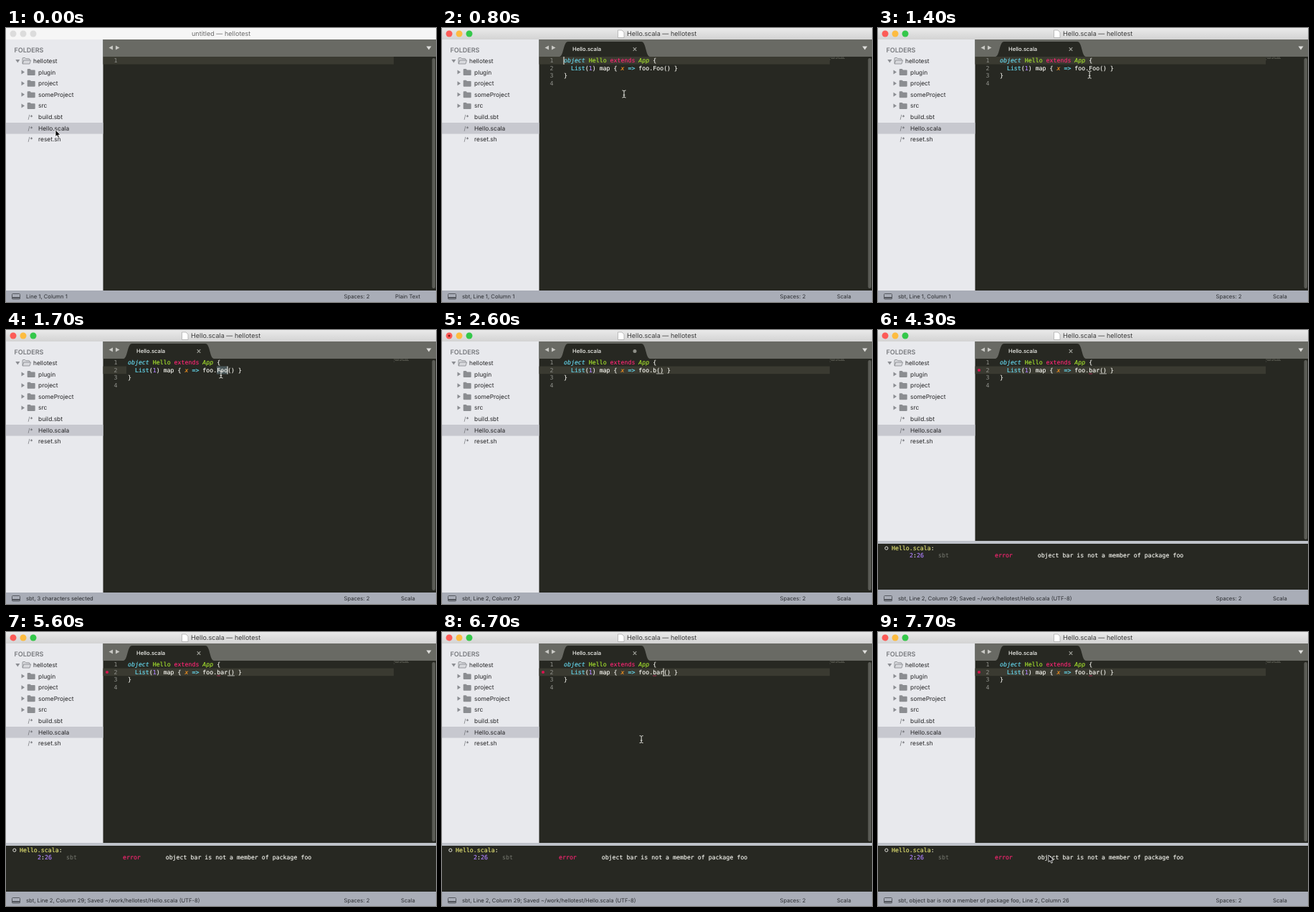
Recreate the animation shown at these times as an HTML page. Size 600 px wide and 382 px high, loop 8 s.

```html
<!DOCTYPE html>
<html lang="en">
<head>
<meta charset="utf-8">
<title>Editor</title>
<style>
  html, body { margin: 0; width: 100%; height: 100%; overflow: hidden; background: #272822; }
  svg { display: block; width: 100vw; height: 100vh; }
  text { font: 8.4px Inter, "Open Sans", sans-serif; fill: #252527; text-rendering: geometricPrecision; white-space: pre; }
  .title { font-size: 9.06px; fill: #3b3b3b; }
  .small { font-size: 7.65px; fill: #2b2d31; }
  .code text { font: 8.25px "DejaVu Sans Mono", monospace; fill: #f8f8f2; stroke: #f8f8f2; stroke-width: .15px; }
  .code .gutter { fill: #8f908a; stroke: none; text-anchor: end; }
  .code .blue { fill: #66d9ef; stroke: #66d9ef; }
  .code .green { fill: #a6e22e; stroke: #a6e22e; }
  .code .pink { fill: #f92672; stroke: #f92672; }
  .code .purple { fill: #ae81ff; stroke: #ae81ff; }
  .code .orange { fill: #fd971f; stroke: #fd971f; }
  .code .yellow { fill: #e6e674; stroke: #e6e674; }
  .code .grey { fill: #797a72; stroke: none; }
  .it { font-style: italic; }
</style>
</head>
<body>
<svg viewBox="0 0 600 382" preserveAspectRatio="none">
  <defs>
    <linearGradient id="chrome" x2="0" y2="1"><stop stop-color="#eaeaea"/><stop offset="1" stop-color="#d3d3d3"/></linearGradient>
    <path id="folder" d="M0 1q0-1 1-1h3l1.2 1.4H10q1 0 1 1V8q0 1-1 1H1q-1 0-1-1z" fill="#8b8d91"/>
    <path id="closed" d="M0 0l4.5 3L0 6z" fill="#8b8d92"/>
  </defs>

  <rect width="600" height="382" fill="#272822"/>
  <rect id="titleBar" width="600" height="16"/>
  <g id="lights"><circle cx="10" cy="8" r="4.5"/><circle cx="24" cy="8" r="4.5"/><circle cx="38" cy="8" r="4.5"/></g>
  <circle id="dirtyLight" cx="10" cy="8" r="1.5" fill="#7d1512"/>
  <path id="docIcon" d="M245.5 3h5.5l3 3v7.500h-8.500z" fill="#fff" stroke="#a5a5a5" stroke-width=".7"/>
  <text id="title" class="title" y="11.300"></text>

  <rect y="16" width="135.500" height="350" fill="#e8e9ed"/>
  <rect y="132" width="135.500" height="15.600" fill="#c7c8cf"/>
  <text x="11.500" y="34.300" style="font-size:9px;font-weight:600;fill:#77797d">FOLDERS</text>
  <g id="tree"></g>

  <rect x="135.500" y="16" width="464.500" height="24" fill="#696a64"/>
  <path d="M149 24.500v6l-5.500-3zM153 24.500v6l5.500-3z" fill="#c9c9c5"/>
  <path d="M586.500 25.500h7l-3.500 5z" fill="#dededb"/>
  <g id="tab">
    <path d="M164 40C170 39 169 19 176 19H278C285 19 284 39 290 40z" fill="#272822"/>
    <text x="182" y="32.300" class="small" style="fill:#f4f4f0;font-weight:500">Hello.scala</text>
    <path id="closeTab" d="M266.700 27.200l4.600 4.600m0-4.600l-4.600 4.600" stroke="#a2a39c" stroke-width="1.100"/>
    <circle id="dirtyTab" cx="269" cy="29.500" r="2.500" fill="#8e8f88"/>
  </g>

  <rect id="lineMark" x="135.500" height="10.600" fill="#3a3a31"/>
  <rect id="selection" x="294" y="50.500" width="15.500" height="11" fill="#4a5759"/>
  <g class="code">
    <text class="gutter" x="155.500" y="48">1</text>
    <g id="source">
      <text class="gutter" x="155.500" y="58.700">2</text>
      <text class="gutter" x="155.500" y="69.300">3</text>
      <text class="gutter" x="155.500" y="79.900">4</text>
      <text x="170" y="48"><tspan class="blue it">object</tspan> <tspan class="green">Hello</tspan> <tspan class="pink">extends</tspan> <tspan class="green it">App</tspan> {</text>
      <text x="170" y="58.700">  <tspan class="blue">List</tspan>(<tspan class="purple">1</tspan>) map { <tspan class="orange it">x</tspan> <tspan class="blue">=&gt;</tspan> foo.<tspan id="member"></tspan>() }</text>
      <text x="170" y="69.300">}</text>
      <path d="M541 41h8m1 0h5m1 0h5M543 42.500h5m1 0h3m1 0h9M541 44h1" stroke="#8e8f83" stroke-width=".8" opacity=".5"/>
    </g>
  </g>
  <path id="brackets" d="M0 60.900h9.900" stroke="#d5d5cd" stroke-width=".8"/>
  <rect id="caret" width="1" height="11" fill="#f8f8f0"/>
  <rect id="scroll" x="594.500" y="42" width="4.500" rx="2.200" fill="#5b5c56"/>

  <g id="panel">
    <circle cx="141" cy="56" r="2.100" fill="#d9134f"/>
    <path d="M294.300 61h4.800" stroke="#f92672" stroke-width=".8" opacity=".7"/>
    <rect y="294" width="600" height="88" fill="#bfc3ca"/>
    <rect y="298" width="600" height="64" fill="#272822"/>
    <circle cx="11.800" cy="304.200" r="2.100" fill="none" stroke="#f8f8f2" stroke-width=".9"/>
    <g class="code">
      <text class="yellow" x="19" y="306.700">Hello.scala<tspan fill="#f8f8f2">:</tspan></text>
      <text x="44" y="317.300"><tspan class="purple">2</tspan>:<tspan class="purple">26</tspan></text>
      <text class="grey" x="84" y="317.300">sbt</text>
      <text class="pink" x="163" y="317.300">error</text>
      <text x="222.700" y="317.300">object bar is not a member of package foo</text>
    </g>
  </g>

  <rect id="statusBar" x="0" width="600" fill="#a9adb7"/>
  <rect x="8.500" y="370.500" width="11" height="7.500" rx="1" fill="none" stroke="#55585f"/>
  <path d="M9 376h10" stroke="#55585f" stroke-width="2"/>
  <text id="status" class="small" x="28" y="377"></text>
  <text class="small" x="471.500" y="377">Spaces: 2</text>
  <text id="syntax" class="small" y="377"></text>

  <path id="arrow" d="M0 0v9.600l2.200-2 1.600 3.600 1.700-.7-1.600-3.500h3z" fill="#000" stroke="#fff" stroke-width=".8"/>
  <path id="beam" d="M-2.500-5q2 0 2.500 1 .5-1 2.500-1M0-4v8M-2.500 5q2 0 2.500-1 .5 1 2.500 1M-1.300 1.500h2.600" fill="none" stroke="#e4e4de" stroke-width="1"/>
</svg>
<script>
const LOOP = 8000;
const OPEN = 300, CLICK = 1500, SELECT = 1600, TYPE = [2500, 2700, 2900], SAVE = 3700, REPORT = 4000, JUMP = 7100;
const CHAR = 4.967, LINE = 10.6;
const el = id => document.getElementById(id);
const show = (id, on) => el(id).setAttribute('visibility', on ? 'visible' : 'hidden');
const set = (id, attrs) => { for (const k in attrs) el(id).setAttribute(k, attrs[k]); };
const label = (id, text) => { if (el(id).textContent !== text) el(id).textContent = text; };

// Time, x, y
const mousePath = [[0, 69, 142], [350, 69, 142], [800, 254, 92], [1000, 254, 92], [1500, 300, 62],
  [6500, 300, 62], [7000, 238, 311], [LOOP, 238, 311]];

function mouseAt(t) {
  const i = mousePath.findIndex(p => p[0] > t);
  const [t0, x0, y0] = mousePath[i - 1], [t1, x1, y1] = mousePath[i];
  const u = (t - t0) / (t1 - t0), e = u * u * (3 - 2 * u);
  return [x0 + (x1 - x0) * e, y0 + (y1 - y0) * e];
}

function buildTree() {
  const folders = ['plugin', 'project', 'someProject', 'src'], files = ['build.sbt', 'Hello.scala', 'reset.sh'];
  let out = `<path d="M13.300 44h6l-3 4.500z" fill="#8b8d92"/>
    <path d="M23 49.500v-7q0-1 1-1h2.500l1.200 1.300H32q1 0 1 1V45M23 50l1.800-5h9.700L33 50z" fill="#d8d9dd" stroke="#85878b" stroke-width=".8"/>
    <text x="38" y="49">hellotest</text>`;
  [...folders, ...files].forEach((name, i) => {
    const y = 46 + 15.6 * (i + 1);
    out += i < folders.length
      ? `<use href="#closed" x="21.500" y="${y - 3}"/><use href="#folder" x="29.700" y="${y - 4.5}"/>`
      : `<text x="30.500" y="${y + 3}" style="font-size:8px;fill:#65676b">/*</text>`;
    out += `<text x="45" y="${y + 3}">${name}</text>`;
  });
  el('tree').innerHTML = out;
}

function statusText(t, typed) {
  if (t < OPEN) return 'Line 1, Column 1';
  if (t < CLICK) return 'sbt, Line 1, Column 1';
  if (t < SELECT) return 'sbt, Line 2, Column 29';
  if (!typed) return 'sbt, 3 characters selected';
  if (t >= JUMP) return 'sbt, object bar is not a member of package foo, Line 2, Column 26';
  const saved = t >= SAVE ? '; Saved ~/work/hellotest/Hello.scala (UTF-8)' : '';
  return `sbt, Line 2, Column ${26 + typed}${saved}`;
}

function render(t) {
  const open = t >= OPEN, reported = t >= REPORT;
  const typed = TYPE.filter(k => t >= k).length;
  const selected = t >= SELECT && !typed;
  const dirty = typed > 0 && t < SAVE;
  const line = t >= CLICK ? 1 : 0;

  set('titleBar', { fill: open ? 'url(#chrome)' : '#f6f6f6' });
  [...el('lights').children].forEach((c, i) =>
    c.setAttribute('fill', open ? ['#fc5b57', '#fdbc40', '#34c84a'][i] : '#dcdcdc'));
  show('dirtyLight', dirty);
  show('docIcon', open);
  label('title', open ? 'Hello.scala — hellotest' : 'untitled — hellotest');
  set('title', { x: open ? 258 : 259, opacity: open ? 1 : .75 });

  el('tab').style.display = el('source').style.display = open ? '' : 'none';
  show('closeTab', !dirty);
  show('dirtyTab', dirty);

  set('lineMark', { y: 40 + line * LINE, width: selected ? 32.5 : 405.5 });
  show('selection', selected);
  label('member', typed ? 'bar'.slice(0, typed) : 'Foo');

  const column = line ? (typed ? 25 + typed : 28) : 0;
  const caretX = 170 + column * CHAR;
  set('caret', { x: caretX - .5, y: 40 + line * LINE });
  show('caret', open && t < JUMP && (t + 300) % LOOP % 1000 < 500);
  set('brackets', { transform: `translate(${caretX} 0)` });
  show('brackets', typed > 0 && t < JUMP);

  el('panel').style.display = reported ? '' : 'none';
  set('scroll', { height: reported ? 250 : 321 });
  set('statusBar', { y: reported ? 362 : 366, height: reported ? 20 : 16 });
  label('status', statusText(t, typed));
  label('syntax', open ? 'Scala' : 'Plain Text');
  set('syntax', { x: open ? 551 : 543 });

  const [x, y] = mouseAt(t);
  const overCode = x > 135 && y > 40 && y < 294;
  const visible = !typed || t >= 6500;
  for (const id of ['arrow', 'beam']) set(id, { transform: `translate(${x} ${y})` });
  show('beam', visible && overCode);
  show('arrow', visible && !overCode);
}

buildTree();
const start = performance.now();
function tick() {
  // The picture advances in steps of 100 ms.
  render(Math.floor((performance.now() - start) % LOOP / 100) * 100);
  requestAnimationFrame(tick);
}
tick();
</script>
</body>
</html>
```
